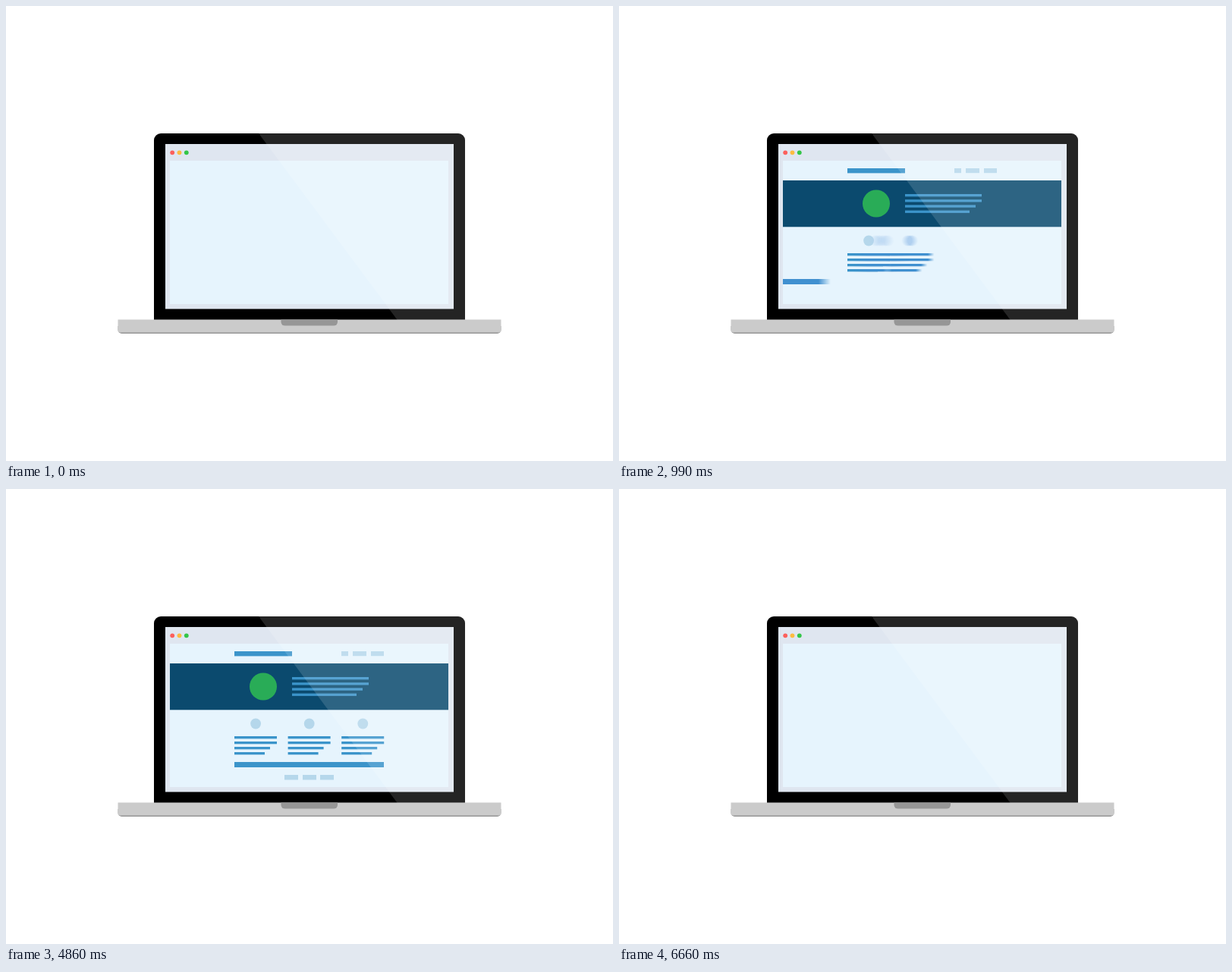
Animation, 800 px wide and 600 px high, one loop 7.2 s. Source, as an HTML page with a canvas:

```html
<!DOCTYPE html>
<html lang="en">
<head>
<meta charset="utf-8">
<title>Laptop page build</title>
<style>
  html, body { margin: 0; width: 100%; height: 100%; overflow: hidden; background: #fff; }
  canvas { display: block; width: 800px; height: 600px; }
</style>
</head>
<body>
<canvas id="stage" width="800" height="600"></canvas>
<script>
const LOOP = 7200, TICK = 30, SHUTTER = 15, SAMPLES = 16;
const SLIDE = 320;                       // entrance time of one part
const EXIT_START = 6240, EXIT_TIME = 400, EXIT_SHIFT = 372;
const PAGE = { x: 216, y: 204, w: 367, h: 189 };
const BLUE = '#3b94ca', PALE = '#b5d7eb', NAVY = '#0b4a6e', GREEN = '#29ac57';

const stage = document.getElementById('stage').getContext('2d');
const layer = document.createElement('canvas');
layer.width = 800;
layer.height = 600;
const blur = layer.getContext('2d');

function rect(c, color, x, y, w, h) {
  c.fillStyle = color;
  c.fillRect(x, y, w, h);
}

function disc(c, color, x, y, r) {
  c.fillStyle = color;
  c.beginPath();
  c.arc(x, y, r, 0, Math.PI * 2);
  c.fill();
}

function rounded(c, color, x, y, w, h, radii) {
  c.fillStyle = color;
  c.beginPath();
  c.roundRect(x, y, w, h, radii);
  c.fill();
}

function lines(c, x, y, step, widths) {
  widths.forEach((w, i) => rect(c, BLUE, x, y + i * step, w, 3.3));
}

function nav(c) {
  for (const [x, w] of [[442, 9], [457, 18], [481, 17]]) rect(c, PALE, x, 214, w, 6.2);
}

function hero(c) {
  disc(c, GREEN, 339, 260.5, 18);
  lines(c, 377, 248, 7.2, [101, 101, 93, 85]);
}

const column = i => c => {
  const x = 301 + i * 70.6;
  disc(c, PALE, x + 28.1, 309.5, 6.9);
  lines(c, x, 326, 7, [56, 56, 47, 40]);
};

const link = x => c => rect(c, PALE, x, 377, 18, 6.5);

// Each part slides in from the left: start time, distance, drawing
const parts = [
  { start: 302, dist: 162, draw: c => rect(c, BLUE, 301, 214, 76, 6.4) },
  { start: 365, dist: 283, draw: nav },
  { start: 443, dist: 371, draw: c => rect(c, NAVY, 216, 230, 370, 61.3) },
  { start: 549, dist: 263, draw: hero },
  { start: 640, dist: 142, draw: column(0) },
  { start: 724, dist: 213, draw: column(1) },
  { start: 817, dist: 283, draw: column(2) },
  { start: 899, dist: 283, draw: c => rect(c, BLUE, 301, 360, 197, 7) },
  { start: 990, dist: 217, draw: link(414) },
  { start: 1080, dist: 194, draw: link(391) },
  { start: 1170, dist: 170, draw: link(367) }
];

const progress = (t, start, time) => Math.min(1, Math.max(0, (t - start) / time));

function offset(part, t) {
  const u = progress(t, part.start, SLIDE);
  const out = progress(t, EXIT_START, EXIT_TIME);
  return -part.dist * (1 - u * u * (3 - 2 * u)) - EXIT_SHIFT * Math.pow(out, 2.3);
}

function drawAt(c, part, dx) {
  c.save();
  c.translate(dx, 0);
  part.draw(c);
  c.restore();
}

function drawPart(part, t) {
  if (t < part.start || t >= EXIT_START + EXIT_TIME) return;
  const from = offset(part, t - SHUTTER / 2);
  const to = offset(part, t + SHUTTER / 2);
  if (Math.abs(to - from) < 0.1) {
    drawAt(stage, part, offset(part, t));
    return;
  }
  // Average the positions passed while the shutter is open
  blur.globalCompositeOperation = 'source-over';
  blur.clearRect(0, 0, 800, 600);
  blur.globalCompositeOperation = 'lighter';
  blur.globalAlpha = 1 / SAMPLES;
  for (let i = 0; i < SAMPLES; i++) {
    drawAt(blur, part, from + (to - from) * (i + 0.5) / SAMPLES);
  }
  stage.drawImage(layer, 0, 0);
}

function drawScreen(t) {
  rounded(stage, '#000', 195, 168, 410, 246, [9, 9, 0, 0]);
  rect(stage, '#dfe6f0', 210, 182, 380, 217.5);
  disc(stage, '#fc605c', 219.2, 193.3, 2.9);
  disc(stage, '#fdbc40', 228.5, 193.3, 2.9);
  disc(stage, '#34c648', 237.8, 193.3, 2.9);

  stage.save();
  stage.beginPath();
  stage.rect(PAGE.x, PAGE.y, PAGE.w, PAGE.h);
  stage.clip();
  rect(stage, '#e6f4fd', PAGE.x, PAGE.y, PAGE.w, PAGE.h);
  parts.forEach(part => drawPart(part, t));
  stage.restore();
}

function gloss() {
  const bezel = new Path2D();
  bezel.roundRect(195, 168, 410, 246, [9, 9, 0, 0]);
  const shine = (color, path) => {
    stage.save();
    stage.clip(bezel);
    stage.clip(path, 'evenodd');
    stage.fillStyle = color;
    stage.beginPath();
    stage.moveTo(333, 168);
    stage.lineTo(605, 168);
    stage.lineTo(605, 414);
    stage.lineTo(515.7, 414);
    stage.fill();
    stage.restore();
  };
  shine('rgba(255,255,255,0.14)', bezel);
}

function drawBase() {
  rounded(stage, '#959595', 147.5, 422, 505, 10, [0, 0, 5, 5]);
  rounded(stage, '#cbcbcb', 147.5, 413.4, 505, 17, [0, 0, 3, 3]);
  rounded(stage, '#969696', 362.5, 413.4, 74.5, 8.2, [0, 0, 5, 5]);
}

function frame(now) {
  const t = Math.floor((now % LOOP) / TICK) * TICK;
  rect(stage, '#fff', 0, 0, 800, 600);
  drawScreen(t);
  gloss();
  drawBase();
}

const begin = performance.now();
function run() {
  frame(performance.now() - begin);
  requestAnimationFrame(run);
}
run();
</script>
</body>
</html>
```
